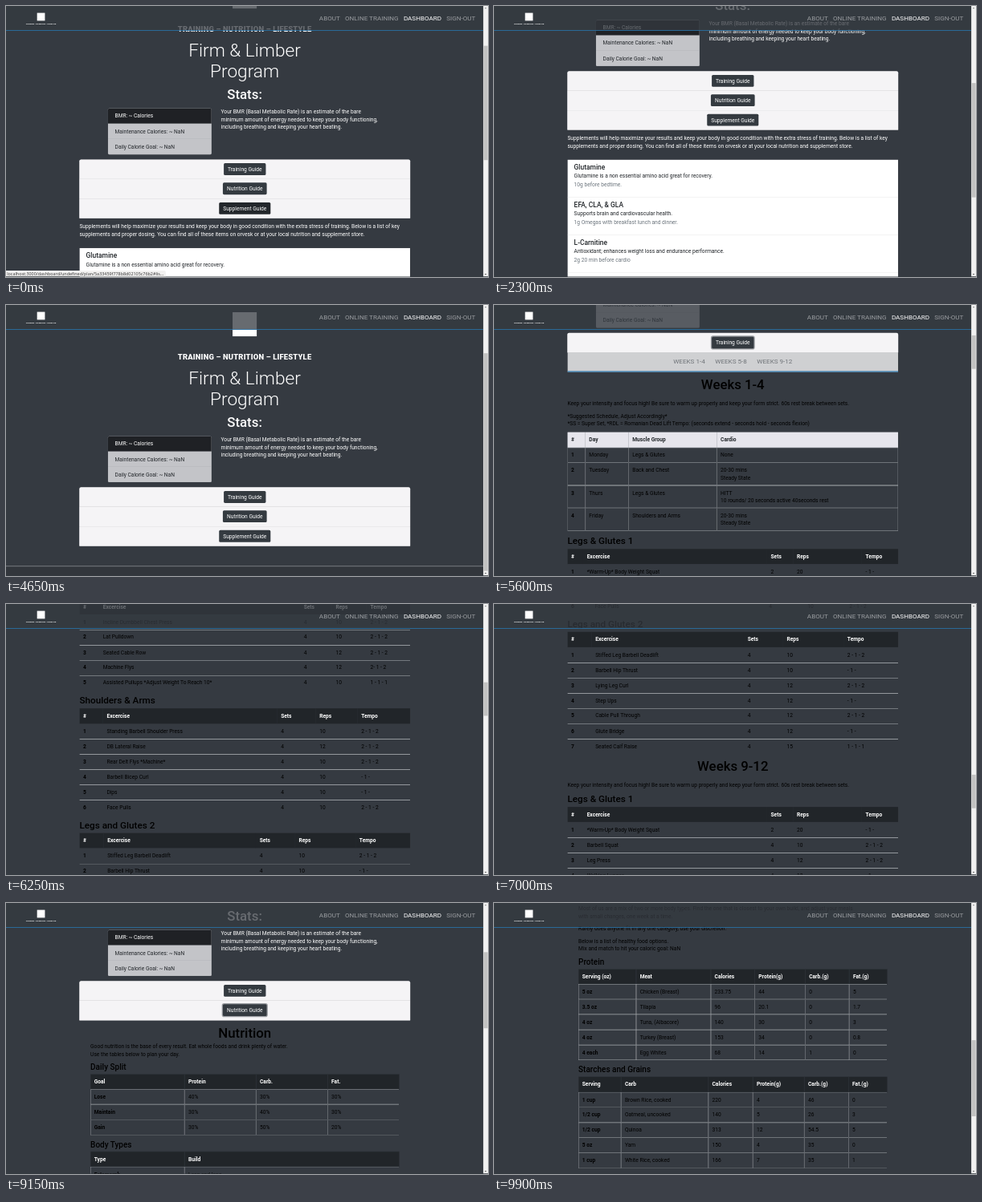
An HTML page for the animation above (10000 ms loop, 600 by 338 pixels).

```html
<!DOCTYPE html>
<html lang="en">
<head>
<meta charset="utf-8">
<title>Fitness dashboard</title>
<style>
html, body { margin: 0; width: 100%; height: 100%; overflow: hidden; background: #353a41; }
/* A 1536 x 864 browser window shown at stage size. */
#screen {
  position: absolute; left: 0; top: 0; width: 1536px; height: 864px; overflow: hidden;
  transform: scale(.390625); transform-origin: 0 0; background: #353a41;
  font: 17px/24px Roboto, sans-serif; color: #fff;
}
#page { position: absolute; left: 0; top: 0; width: 1521px; }
#page > .hero { position: absolute; white-space: nowrap; }
p { margin: 0 0 16px; white-space: nowrap; }
h1, h3, h4, h5 { margin: 0 0 8px; font-weight: 500; }
h1 { font-size: 43px; line-height: 48px; text-align: center; }
h3 { font-size: 30px; line-height: 33.6px; }
h4 { font-size: 25.6px; line-height: 28.8px; }
h5 { font-size: 21.6px; line-height: 24px; margin-bottom: 4px; }

.mark { background: #fff; }
.tagline { font-weight: 900; text-align: center; white-space: nowrap; }
.title { left: 0; width: 100%; top: 373px; font-size: 58px; font-weight: 300; line-height: 67.2px; text-align: center; }
.stats { left: 325px; top: 592px; width: 330px; border-radius: 4px; overflow: hidden; background: #c3c4c8; color: #212529; }
.stats div { box-sizing: border-box; height: 49px; padding: 12px 22px; border-bottom: 1px solid #aeb0b4; }
.stats div:first-child { background: #1f2125; color: #fff; }

#cards { width: 1054px; margin-left: 234px; padding-top: 754.5px; }
.head {
  box-sizing: border-box; height: 62.5px; padding-top: 12px; text-align: center;
  background: #f5f4f6; box-shadow: 0 1px #d9d9dc;
}
.head:first-child { border-radius: 5px 5px 0 0; }
.btn { display: inline-block; padding: 7px 13px; border-radius: 4px; background: #343a40; }
.btn.hover { background: #23272b; }
.btn.focus { background: #343a40; box-shadow: 0 0 0 3.2px #999ca0; }
.panel { overflow: hidden; }
.panel > div { display: flow-root; }

.plan { color: #000; }
.tabs {
  box-sizing: border-box; height: 63px; padding-top: 18px; border-bottom: 3px solid #2878b0;
  background: #cfd0d2; color: #6f7378; font-size: 20.7px; text-align: center;
}
.tabs span { padding: 0 16px; }
.plan h1 { margin: 16px 0 24px; }
.food { padding: 0 35px; }
table { width: 100%; table-layout: fixed; border-spacing: 0; margin-bottom: 16px; }
th, td { padding: 12px 12px 12.6px; text-align: left; vertical-align: top; white-space: nowrap; }
tbody tr + tr { box-shadow: inset 0 2px #b4b8bc; }
.grid tbody tr { box-shadow: none; }
.grid tbody th, .grid tbody td { box-shadow: inset 0 0 0 1px #a9adb1; }
thead tr { background: #212529; color: #fff; }
.grid thead th { box-shadow: inset 0 0 0 1px #32383e; }
.light thead tr { background: #e6e5ec; color: #212529; }
.light thead th { box-shadow: inset 0 0 0 1px #d8d9df; }

.doses { margin-top: 33px; background: #fff; color: #212529; }
.doses div { box-sizing: border-box; height: 120px; padding: 12px 21px; border-bottom: 1px solid #dfdfdf; }
.doses p { margin-bottom: 4px; }
.doses p + p { color: #6c757d; }
footer { height: 31px; margin-top: 64px; box-sizing: border-box; border-top: 2px solid #8b8e92; background: #32363c; }

nav {
  position: absolute; left: 0; top: 0; width: 1521px; height: 79px; box-sizing: border-box;
  background: rgba(52, 58, 64, .75); border-bottom: 2px solid #2878b0;
}
nav .links { position: absolute; right: 25px; top: 26px; font-size: 20.7px; color: #9a9da0; white-space: nowrap; }
nav .links span { margin-left: 16px; }
nav .on { color: #fff; }
#bar { position: absolute; right: 0; top: 0; width: 15px; height: 864px; background: #f1f1f1; }
#thumb { position: absolute; left: 1px; width: 13px; background: #c1c1c1; }
.arrow { position: absolute; left: 4px; width: 7px; height: 4px; background: #505050; clip-path: polygon(0 100%, 50% 0, 100% 100%); }
.arrow.down { bottom: 5px; transform: scaleY(-1); }
.arrow.up { top: 5px; }
#status {
  position: absolute; left: 0; bottom: 0; width: 509px; height: 19px; border-radius: 0 4px 0 0;
  background: #f2f1f0; color: #3c3c3c; font: 13.8px/18px "Noto Sans", sans-serif;
  white-space: nowrap; text-indent: 3px; overflow: hidden;
}
</style>
</head>
<body>
<div id="screen">
  <div id="page">
    <div class="hero mark" style="left:722px;top:196px;width:77px;height:77px"></div>
    <div class="hero tagline" style="left:0;width:100%;top:326px;font-size:24px;letter-spacing:.5px">TRAINING – NUTRITION – LIFESTYLE</div>
    <div class="hero title">Firm &amp; Limber<br>Program</div>
    <h1 class="hero" style="left:0;width:100%;top:522px">Stats:</h1>
    <div class="hero stats">
      <div>BMR: ~ Calories</div><div>Maintenance Calories: ~ NaN</div><div>Daily Calorie Goal: ~ NaN</div>
    </div>
    <p class="hero" style="left:685px;top:591px">Your BMR (Basal Metabolic Rate) is an estimate of the bare<br>minimum amount of energy needed to keep your body functioning,<br>including breathing and keeping your heart beating.</p>
    <div id="cards"></div>
    <footer></footer>
  </div>
  <nav>
    <div class="mark" style="position:absolute;left:99px;top:22px;width:25px;height:25px"></div>
    <div class="tagline" style="position:absolute;left:23px;width:177px;top:44px;font-size:5.6px">TRAINING – NUTRITION – LIFESTYLE</div>
    <div class="links"><span>ABOUT</span><span>ONLINE TRAINING</span><span class="on">DASHBOARD</span><span>SIGN-OUT</span></div>
  </nav>
  <div id="bar"><div class="arrow up"></div><div id="thumb"></div><div class="arrow down"></div></div>
  <div id="status"></div>
</div>
<script>
const SCALE = .390625, VIEW = 864, LOOP = 10000, STEP = 50;
const CARDS_TOP = 754.5, HEAD = 62.5;
const $ = s => document.querySelector(s);

const cells = (tag, list) => list.map(c => `<${tag}>${c}</${tag}>`).join('');
function table(kind, widths, head, rows) {
  const cols = widths.map(w => `<col style="width:${w}px">`).join('');
  const body = rows.map(([first, ...rest]) => `<tr><th>${first}</th>${cells('td', rest)}</tr>`).join('');
  return `<table class="${kind}"><colgroup>${cols}</colgroup><thead><tr>${cells('th', head.split('|'))}</tr></thead><tbody>${body}</tbody></table>`;
}
const parse = text => text.trim().split('\n').map(line => line.trim().split('|'));
const numbered = text => parse(text).map((row, i) => [i + 1, ...row]);

const workouts = [
  ['Legs &amp; Glutes 1', [50, 586, 83, 219, 116], `*Warm-Up* Body Weight Squat|2|20|- 1 -
    Barbell Squat|4|10|2 - 1 - 2
    Leg Press|4|12|2 - 1 - 2
    Walking Lunges|4|12|- 1 -
    Leg Extension|4|12|2 - 1 - 2
    Glute Kickbacks|4|12|1 - 1 - 1
    Standing Calf Raise|4|15|1 - 1 - 1`],
  ['Back and Chest', [63, 640, 102, 110, 139], `Incline Dumbbell Chest Press|4|10|2 - 1 - 2
    Lat Pulldown|4|10|2 - 1 - 2
    Seated Cable Row|4|12|2 - 1 - 2
    Machine Flys|4|12|2- 1 - 2
    Assisted Pullups *Adjust Weight To Reach 10*|4|10|1 - 1 - 1`],
  ['Shoulders &amp; Arms', [75, 555, 123, 133, 168], `Standing Barbell Shoulder Press|4|10|2 - 1 - 2
    DB Lateral Raise|4|12|2 - 1 - 2
    Rear Delt Flys *Machine*|4|10|2 - 1 - 2
    Barbell Bicep Curl|4|10|- 1 -
    Dips|4|10|- 1 -
    Face Pulls|4|10|2 - 1 - 2`],
  ['Legs and Glutes 2', [77, 485, 125, 193, 174], `Stiffed Leg Barbell Deadlift|4|10|2 - 1 - 2
    Barbell Hip Thrust|4|10|- 1 -
    Lying Leg Curl|4|12|2 - 1 - 2
    Step Ups|4|12|- 1 -
    Cable Pull Through|4|12|2 - 1 - 2
    Glute Bridge|4|12|- 1 -
    Seated Calf Raise|4|15|1 - 1 - 1`],
];
const blocks = workouts.map(([name, widths, rows]) =>
  `<h3>${name}</h3>` + table('', widths, '#|Excercise|Sets|Reps|Tempo', numbered(rows))).join('');
const schedule = table('grid light', [57, 138, 281, 578], '#|Day|Muscle Group|Cardio', numbered(
  `Monday|Legs &amp; Glutes|None
  Tuesday|Back and Chest|20-30 mins<br>Steady State
  Thurs|Legs &amp; Glutes|HITT<br>10 rounds/ 20 seconds active 40seconds rest
  Friday|Shoulders and Arms|20-30 mins<br>Steady State`));
const focusNote = '<p>Keep your intensity and focus high! Be sure to warm up properly and keep your form strict. 60s rest break between sets.</p>';

const training = `<div class="plan">
  <div class="tabs"><span>WEEKS 1-4</span><span>WEEKS 5-8</span><span>WEEKS 9-12</span></div>
  <h1>Weeks 1-4</h1>${focusNote}
  <p>*Suggested Schedule, Adjust Accordingly*<br>*SS = Super Set, *RDL = Romanian Dead Lift Tempo: (seconds extend - seconds hold - seconds flexion)</p>
  ${schedule}${blocks}
  ${['Weeks 5-8', 'Weeks 9-12'].map(w => `<h1>${w}</h1>${focusNote}${blocks}`).join('')}</div>`;

const foods = (name, widths, head, rows) => `<h4>${name}</h4>` + table('grid', widths, head, parse(rows));
const nutrients = 'Calories|Protein(g)|Carb.(g)|Fat.(g)';
const nutrition = `<div class="plan food">
  <h1 style="margin-bottom:8px">Nutrition</h1>
  <p>Good nutrition is the base of every result. Eat whole foods and drink plenty of water.<br>Use the tables below to plan your day.</p>
  ${foods('Daily Split', [300, 228, 228, 228], 'Goal|Protein|Carb.|Fat.', `Lose|40%|30%|30%
    Maintain|30%|40%|30%
    Gain|30%|50%|20%`)}
  ${foods('Body Types', [300, 684], 'Type|Build', `Ectomorph|Lean and long
    Mesomorph|Muscular
    Endomorph|Broad and solid`)}
  <p>Most of us are a mix of two or more body types. Find the one that is closest to your own build, and adjust your meals<br>with small changes, one week at a time.</p>
  <p>Rarely does anyone fit in any one category, use your discretion.</p>
  <p>Below is a list of healthy food options.<br>Mix and match to hit your caloric goal: NaN</p>
  ${foods('Protein', [184, 238, 140, 161, 140, 121], 'Serving (oz)|Meat|' + nutrients, `5 oz|Chicken (Breast)|233.75|44|0|5
    3.5 oz|Tilapia|96|20.1|0|1.7
    4 oz|Tuna, (Albacore)|140|30|0|3
    4 oz|Turkey (Breast)|153|34|0|0.8
    4 each|Egg Whites|68|14|1|0`)}
  ${foods('Starches and Grains', [136, 278, 142, 164, 141, 123], 'Serving|Carb|' + nutrients, `1 cup|Brown Rice, cooked|220|4|46|0
    1/2 cup|Oatmeal, uncooked|140|5|26|3
    1/2 cup|Quinoa|313|12|54.5|5
    5 oz|Yam|150|4|35|0
    1 cup|White Rice, cooked|166|7|35|1`)}
  ${foods('Fats', [136, 278, 142, 164, 141, 123], 'Serving|Fat|' + nutrients, `1 oz|Almonds|164|6|6|14
    1 oz|Walnuts|185|4|4|18
    1/2 each|Avocado|160|2|9|15
    1 tbsp|Olive Oil|119|0|0|14
    2 tbsp|Peanut Butter|188|8|6|16
    1 tbsp|Flax Seeds|55|2|3|4
    1 tbsp|Coconut Oil|117|0|0|14`)}</div>`;

const doses = parse(`Glutamine|Glutamine is a non essential amino acid great for recovery.|10g before bedtime.
  EFA, CLA, &amp; GLA|Supports brain and cardiovascular health.|1g Omegas with breakfast lunch and dinner.
  L-Carnitine|Antioxidant; enhances weight loss and endurance performance.|2g 20 min before cardio
  Digestive Enzymes|Helps your body break down and absorb food.|1 with each meal.
  Multivitamin|Covers the daily vitamins and minerals.|1 with breakfast.
  Whey Protein|Fast protein for muscle repair.|1 scoop after training.
  BCAA|Amino acids that support lean muscle.|5g during training.`);
const supplements = `<div><p style="margin:15px 0 0">Supplements will help maximize your results and keep your body in good condition with the extra stress of training. Below is a list of key<br>supplements and proper dosing. You can find all of these items on orvesk or at your local nutrition and supplement store.</p>
  <div class="doses">${doses.map(([name, use, dose]) => `<div><h5>${name}</h5><p>${use}</p><p>${dose}</p></div>`).join('')}</div></div>`;

$('#cards').innerHTML = [['Training', training], ['Nutrition', nutrition], ['Supplement', supplements]]
  .map(([name, body]) => `<div class="head"><span class="btn">${name} Guide</span></div><div class="panel">${body}</div>`).join('');

const panels = [...document.querySelectorAll('.panel')];
const buttons = [...document.querySelectorAll('.btn')];
const fullHeights = panels.map(p => p.offsetHeight);

// Scroll offset that puts a heading's top edge at y while only its own panel is open.
function scrollFor(panel, tag, text, y) {
  const el = [...panels[panel].querySelectorAll(tag)].find(e => e.textContent === text);
  const inside = (el.getBoundingClientRect().top - panels[panel].getBoundingClientRect().top) / SCALE;
  return CARDS_TOP + HEAD * (panel + 1) + inside - y;
}

const openTracks = [
  [[5000, 0], [5250, 1], [8000, 1], [8200, 0]],
  [[8700, 0], [8950, 1]],
  [[4250, 1], [4500, 0]],
];
const scrollTrack = [
  [1950, 265], [2300, 547], [2550, 1000], [2850, 800], [2950, 800], [3200, 557],
  [4250, 557], [4500, 173], [5200, 173], [5600, 666], [5850, 760], [5950, 760],
  [6250, scrollFor(0, 'h3', 'Shoulders & Arms', 291.7)], [6400, 2480], [6500, 2480],
  [7000, 4300], [7100, 4300], [7750, 173], [8950, 173],
  [9750, scrollFor(1, 'h4', 'Starches and Grains', 518)],
];
const statusTrack = [
  [1450, 1], [1600, 0], [3350, 0], [3450, 1], [4450, 1], [4550, 0], [4700, 0], [4800, 1],
  [5100, 1], [5200, 0], [7750, 0], [7900, 1], [8300, 1], [8400, 0],
];

function sample(track, t) {
  const next = track.findIndex(k => k[0] > t);
  if (next < 0) return track[track.length - 1][1];
  if (next === 0) return track[0][1];
  const [[t0, v0], [t1, v1]] = [track[next - 1], track[next]];
  return v0 + (v1 - v0) * (t - t0) / (t1 - t0);
}

function render(t) {
  panels.forEach((p, i) => p.style.height = fullHeights[i] * sample(openTracks[i], t) + 'px');
  const height = $('#page').offsetHeight;
  const scroll = Math.min(sample(scrollTrack, t), height - VIEW);
  $('#page').style.transform = `translateY(${-scroll}px)`;

  const track = VIEW - 30;
  $('#thumb').style.top = 15 + track * scroll / height + 'px';
  $('#thumb').style.height = track * VIEW / height + 'px';

  buttons[0].classList.toggle('focus', t >= 5050 && t < 8750);
  buttons[1].classList.toggle('focus', t >= 8750);
  buttons[2].classList.toggle('hover', t < 1500 || (t >= 3300 && t < 4450));

  $('#status').style.opacity = sample(statusTrack, t);
  $('#status').textContent = 'localhost:3000/dashboard/undefined/plan/5a33459f778b8d02105c76b2#' + (t < 4600 ? 'lis...' : 'c...');
}

const start = performance.now();
function tick() {
  const t = (performance.now() - start) % LOOP;
  render(Math.floor(t / STEP) * STEP);
  requestAnimationFrame(tick);
}
tick();
</script>
</body>
</html>
```
